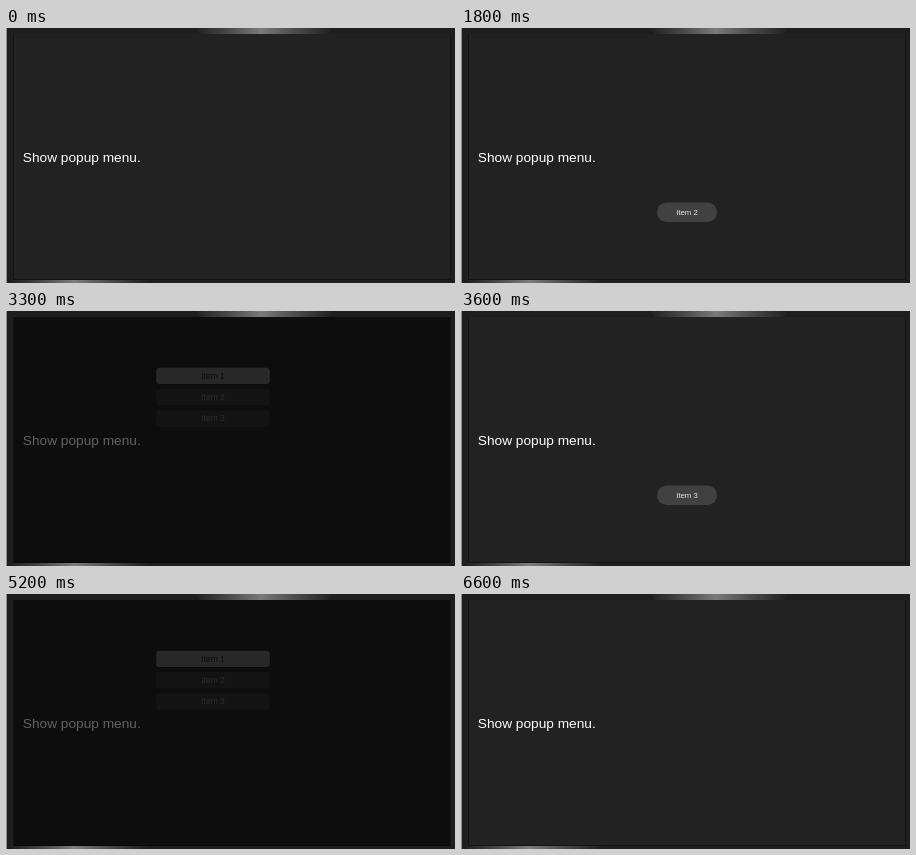
Animation of 449 by 255 pixels, one loop 7.2 s. Source, as an HTML page with a canvas:

```html
<!DOCTYPE html>
<html lang="en">
<head>
<meta charset="utf-8">
<title>Popup menu</title>
<style>
html, body { margin: 0; width: 100%; height: 100%; overflow: hidden; background: #1e1e1e; }
canvas { display: block; }
</style>
</head>
<body>
<canvas id="stage" width="449" height="255"></canvas>
<script>
const stage = document.getElementById('stage').getContext('2d');
const layer = new OffscreenCanvas(449, 255).getContext('2d');
let ctx = stage;

const LOOP = 7200, STEP = 100;
const FONT = '"Liberation Sans", Arial, sans-serif';
const SCREEN = [8, 6, 436, 246];
const CENTER = { x: 207, y: 86 };

// Each popup opens, closes on a picked item, then shows a toast.
const popups = [
  { open: 200, close: 1500, toast: 1700, toastEnd: 2600, pick: 2, scrim: false },
  { open: 2500, close: 3200, toast: 3500, toastEnd: 4300, pick: 3, scrim: true },
  { open: 4180, close: 5100, toast: 5300, toastEnd: 6500, pick: 1, scrim: true }
];

const clamp = v => Math.max(0, Math.min(1, v));
const gray = v => `rgb(${v},${v},${v})`;

function roundRect(x, y, w, h, r, fill) {
  ctx.beginPath();
  ctx.roundRect(x, y, w, h, r);
  ctx.fillStyle = fill;
  ctx.fill();
}

function label(text, x, y, size, color, align = 'center') {
  ctx.font = `${size}px ${FONT}`;
  ctx.textAlign = align;
  ctx.fillStyle = color;
  ctx.fillText(text, x, y);
}

function sheen(y, h, left, peak, right, level) {
  const g = ctx.createLinearGradient(left, 0, right, 0);
  const mid = (peak - left) / (right - left);
  g.addColorStop(0, gray(30));
  g.addColorStop(mid * 0.5, gray(72));
  g.addColorStop(mid, gray(level));
  g.addColorStop((1 + mid) / 2, gray(72));
  g.addColorStop(1, gray(30));
  ctx.beginPath();
  ctx.moveTo(left, y);
  ctx.lineTo(right, y);
  ctx.lineTo(right - h, y + h);
  ctx.lineTo(left + h, y + h);
  ctx.fillStyle = g;
  ctx.fill();
}

function drawBezel() {
  ctx.fillStyle = gray(30);
  ctx.fillRect(0, 0, 449, 255);
  ctx.fillStyle = gray(20);
  ctx.fillRect(7, 6, 438, 246);
  ctx.fillStyle = gray(34);
  ctx.fillRect(8, 6, 436, 245);
  sheen(0, 6, 188, 255, 328, 122);
  sheen(252, 3, 4, 68, 142, 125);
  ctx.fillStyle = gray(140);
  ctx.fillRect(0, 0, 1, 255);
}

function drawPrompt(dimmed) {
  const text = 'Show popup menu.';
  if (dimmed) {
    ctx.lineWidth = 1.5;
    ctx.strokeStyle = gray(18);
    ctx.font = `13.7px ${FONT}`;
    ctx.textAlign = 'left';
    ctx.strokeText(text, 16.8, 134);
  }
  label(text, 16.8, 134, 13.7, gray(dimmed ? 92 : 255), 'left');
}

function toastAlpha(p, t) {
  if (t < p.toast || t > p.toastEnd) return 0;
  if (t === p.toastEnd) return 0.5;
  return t === p.toast ? 0.3 : 1;
}

function drawToast(p, alpha) {
  ctx.globalAlpha = alpha;
  roundRect(196, 174.5, 60, 19.5, 9.75, gray(65));
  label(`Item ${p.pick}`, 226, 187, 7.7, gray(230));
  ctx.globalAlpha = 1;
}

function drawScrim(toastVisible) {
  ctx.fillStyle = 'rgba(0,0,0,0.62)';
  ctx.fillRect(...SCREEN);
  if (!toastVisible) return;
  ctx.beginPath();
  ctx.roundRect(173, 155, 105, 65, 32);
  ctx.roundRect(196, 174.5, 60, 19.5, 9.75);
  ctx.fillStyle = 'rgba(0,0,0,0.15)';
  ctx.fill('evenodd');
}

function menuAlpha(p, t) {
  return t < p.close
    ? clamp((t - p.open) / 300)
    : clamp(1 - (t - p.close + 100) / 230);
}

function drawItem(i, shade, outlined) {
  const y = (i - 2) * 23;
  const focused = i === 1;
  if (outlined && focused) {
    roundRect(-65, y - 13.5, 130, 26.5, 7, gray(4));
    roundRect(-62.8, y - 11, 125.6, 21.5, 5.5, gray(150));
    roundRect(-62, y - 10.2, 124, 19.9, 5, gray(10));
  } else if (outlined) {
    roundRect(-61.8, y - 9.3, 123.6, 19.1, 5, gray(15));
  }
  roundRect(-61, y - 8.5, 122, 17.5, 3.5, gray(shade));
  label(`Item ${i}`, 0, y + 3.2, 9.2, gray(focused ? 10 : 245));
}

function drawMenu(p, t) {
  const alpha = menuAlpha(p, t);
  if (!alpha) return;
  const scale = 0.92 + 0.08 * alpha;
  const heat = t > p.close ? 0 : clamp(1 - (p.close - t) * 0.0035);
  // Compose the menu off stage so that it fades as one group.
  ctx = layer;
  ctx.clearRect(0, 0, 449, 255);
  ctx.save();
  ctx.translate(CENTER.x, CENTER.y);
  ctx.scale(scale, scale);
  for (let i = 1; i <= 3; i++) {
    const base = i === 1 ? 222 : 60;
    const hot = i === p.pick ? heat : 0;
    drawItem(i, Math.round(base + (230 - base) * hot), alpha === 1);
  }
  ctx.restore();
  ctx = stage;
  ctx.globalAlpha = alpha;
  ctx.drawImage(layer.canvas, 0, 0);
  ctx.globalAlpha = 1;
}

function draw(t) {
  const active = popups.find(p => t >= p.open && t < p.close + 200);
  const toast = popups.find(p => toastAlpha(p, t) > 0);
  drawBezel();
  drawPrompt(active && !active.scrim);
  if (toast) drawToast(toast, toastAlpha(toast, t));
  if (!active) return;
  if (active.scrim) drawScrim(toast);
  drawMenu(active, t);
}

function tick() {
  draw(Math.floor((performance.now() % LOOP) / STEP) * STEP);
  requestAnimationFrame(tick);
}
tick();
</script>
</body>
</html>
```
